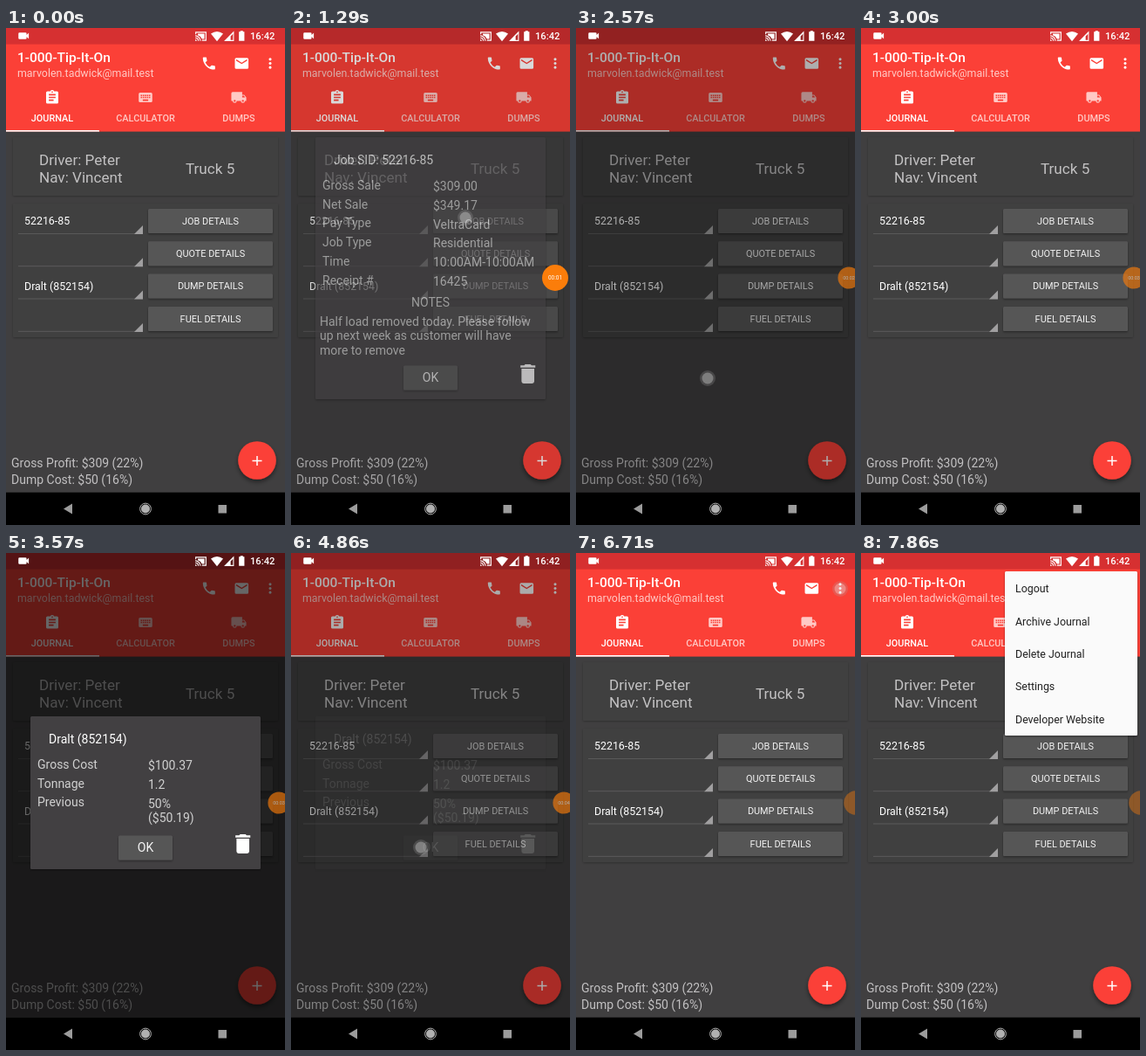
Animation of 320 by 569 pixels, one loop 8 s. Source, as an HTML page:

```html
<!DOCTYPE html>
<html lang="en">
<head>
<meta charset="utf-8">
<title>Job journal</title>
<style>
  html, body { margin: 0; height: 100%; overflow: hidden; background: #000; }
  svg { display: block; font-family: Roboto, sans-serif; }
</style>
</head>
<body>
<script>
const LOOP = 8000, STEP = 1000 / 7;
const GREY = '#c2c1c2', RED = '#fb4037', DARK_RED = '#d63031', PALE = '#ffc9c5';
const STATUS_H = 18.6, NAV_Y = 531.7;

const rect = (x, y, w, h, fill, extra = '') =>
  `<rect x="${x}" y="${y}" width="${w}" height="${h}" fill="${fill}" ${extra}/>`;
const text = (x, y, str, size = 14, fill = GREY, extra = '') =>
  `<text x="${x}" y="${y}" font-size="${size}" fill="${fill}" ${extra}>${str}</text>`;
const icon = (d, cx, cy, size = 18.7, fill = '#fff') =>
  `<path d="${d}" fill="${fill}" fill-rule="evenodd" transform="translate(${cx - size / 2} ${cy - size / 2}) scale(${size / 24})"/>`;
const shadow = (id, dy, blur, opacity) =>
  `<filter id="${id}" x="-30%" y="-30%" width="160%" height="170%">
    <feDropShadow dx="0" dy="${dy}" stdDeviation="${blur}" flood-opacity="${opacity}"/></filter>`;
const MIDDLE = 'text-anchor="middle"', MEDIUM = 'font-weight="500"';
const RAISED = 'rx="1.5" filter="url(#raised)"', FLAT = 'rx="1.5" filter="url(#flat)"';

const keys = [5, 8, 11, 14, 17].map(x => `M${x} 8h2v2h-2zM${x} 11h2v2h-2z`).join('');
const ICONS = {
  phone: 'M4 3h3.5q1 0 1 1 0 1.9.6 3.6.1.6-.3 1l-2.2 2.2q2.2 4.4 6.6 6.6l2.2-2.2q.5-.4 1-.3 1.7.6 3.6.6 1 0 1 1V20q0 1-1 1A17 17 0 0 1 3 4q0-1 1-1z',
  mail: 'M4 4h16q2 0 2 2v12q0 2-2 2H4q-2 0-2-2V6q0-2 2-2zM20 6l-8 5-8-5v2l8 5 8-5z',
  more: 'M12 4a2 2 0 1 0 .01 0zM12 10a2 2 0 1 0 .01 0zM12 16a2 2 0 1 0 .01 0z',
  journal: 'M5 3h4.2a3 3 0 0 1 5.6 0H19q2 0 2 2v14q0 2-2 2H5q-2 0-2-2V5q0-2 2-2zM12 3a1 1 0 1 0 .01 0zM7 7h10v2H7zM7 11h10v2H7zM7 15h7v2H7z',
  keyboard: 'M4 5h16q2 0 2 2v10q0 2-2 2H4q-2 0-2-2V7q0-2 2-2zM8 15h8v2H8z' + keys,
  truck: 'M3 4h14v4h3l3 4v5h-2a3 3 0 0 1-6 0H9a3 3 0 0 1-6 0H1V6q0-2 2-2zM17 9.5V12h4.5l-2-2.5zM6 15.5a1.5 1.5 0 1 0 .01 0zM18 15.5a1.5 1.5 0 1 0 .01 0z',
  trash: 'M6 7h12v12q0 2-2 2H8q-2 0-2-2zM5 4h3.5l1-1h5l1 1H19v2H5z',
  camera: 'M4 6h11q2 0 2 2v2.5l4-4v11l-4-4V16q0 2-2 2H4q-2 0-2-2V8q0-2 2-2z',
  cast: 'M1 3h22v18h-9v-2h7V5H3v3H1zM1 18a3 3 0 0 1 3 3H1zM1 14a7 7 0 0 1 7 7H6a5 5 0 0 0-5-5zM1 10a11 11 0 0 1 11 11h-2a9 9 0 0 0-9-9zM6 7h13v10h-5q-2-5-8-7z',
  wifi: 'M12 22L0 7q12-9 24 0z',
  signal: 'M1 22L22 1v21zM15 12v8h5V7z',
  battery: 'M9 1h6v2h3v20H6V3h3z'
};

const button = (x, cy, w, label, size) =>
  rect(x, cy - 14, w, 28, '#575657', RAISED) +
  text(x + w / 2, cy + size * .355, label, size, '#f4f4f4', MIDDLE);

const statusIcons = icon(ICONS.camera, 20.5, 9, 15) + icon(ICONS.cast, 223.5, 9.5, 14) +
  icon(ICONS.wifi, 242, 9.5, 14) + icon(ICONS.signal, 256, 9.5, 13) +
  icon(ICONS.battery, 270.3, 9, 12.5) + text(280, 13.3, '16:42', 11.2, '#fff', MEDIUM);

const tab = (cx, label, name, fill) =>
  icon(ICONS[name], cx, 79.5, 18.7, fill) + text(cx, 107, label, 10.9, fill, `${MIDDLE} ${MEDIUM}`);

const header = rect(0, 0, 320, 118.6, RED) + rect(0, 0, 320, STATUS_H, DARK_RED) +
  text(13, 38.5, '1-000-Tip-It-On', 15.56, '#fff', MEDIUM) +
  text(13, 56, 'marvolen.tadwick@mail.test', 12.4, PALE) +
  icon(ICONS.phone, 232.8, 40.5) + icon(ICONS.mail, 270.3, 40.5) + icon(ICONS.more, 303, 40.5) +
  tab(53, 'JOURNAL', 'journal', '#fff') + tab(160, 'CALCULATOR', 'keyboard', PALE) +
  tab(267, 'DUMPS', 'truck', PALE) + rect(0, 117, 107, 1.6, '#fff');

const row = (label, i, value) => {
  const cy = 221 + i * 37.3;
  return text(21, cy + 4.4, value, 12.4, '#fff') +
    rect(14, cy + 14, 143, .8, '#605f60') +
    `<path d="M157 ${cy + 5}v10h-10z" fill="#a09fa0"/>` + button(163, cy, 143, label, 10.9);
};

const page = rect(0, 118, 320, 414, '#403f40') +
  rect(8, 125, 304, 67, '#414041', FLAT) + rect(8, 201, 304, 153, '#414041', FLAT) +
  text(38, 157, 'Driver: Peter', 17.1) + text(38, 177, 'Nav: Vincent', 17.1) +
  text(206, 167, 'Truck 5', 17.1) +
  row('JOB DETAILS', 0, '52216-85') + row('QUOTE DETAILS', 1, '') +
  row('DUMP DETAILS', 2, 'Dralt (852154)') + row('FUEL DETAILS', 3, '') +
  text(6, 503, 'Gross Profit: $309 (22%)') + text(6, 522, 'Dump Cost: $50 (16%)') +
  `<circle cx="288" cy="495" r="21.8" fill="${RED}" filter="url(#floating)"/>
   <path d="M282.5 495.5h11M288 490v11" stroke="#fff" stroke-width="1.5"/>`;

const navBar = rect(0, NAV_Y, 320, 37.3, '#000') +
  `<path d="M66 550.5l10-6v12z" fill="#9c9c9c"/>
   <circle cx="160" cy="550.5" r="6.4" fill="none" stroke="#b0b0b0"/>
   <circle cx="160" cy="550.5" r="5" fill="#b0b0b0"/>` + rect(243.5, 546, 9.5, 9.5, '#9c9c9c');

// Rows are [label, value]; an empty label continues the value above.
const dialog = (id, top, height, title, rows, notes = '') => {
  const bottom = top + height;
  return `<g id="${id}">` + rect(28, top, 264, height, '#424142', RAISED) +
    text(49, top + 31, title, 14, '#fff') +
    rows.map(([label, value], i) => {
      const y = top + 60 + i * 21.7 - (label ? 0 : 5.3);
      return text(36, y, label, 14, '#d0d0d0') + text(163, y + 1.2, value, 14, '#d0d0d0');
    }).join('') + notes +
    button(129, bottom - 24.5, 62, 'OK', 14) + icon(ICONS.trash, 271.7, bottom - 29, 29.3) + '</g>';
};

const notes = text(160, 319, 'NOTES', 14, '#d0d0d0', MIDDLE) +
  ['Half load removed today. Please follow', 'up next week as customer will have', 'more to remove']
    .map((line, i) => text(33, 341 + i * 16.4, line, 14, '#d0d0d0')).join('');

const dialogs = dialog('job', 125, 300, 'Job SID: 52216-85', [
  ['Gross Sale', '$309.00'], ['Net Sale', '$349.17'], ['Pay Type', 'VeltraCard'],
  ['Job Type', 'Residential'], ['Time', '10:00AM-10:00AM'], ['Receipt #', '16425']
], notes) + dialog('dump', 187, 175, 'Dralt (852154)', [
  ['Gross Cost', '$100.37'], ['Tonnage', '1.2'], ['Previous', '50%'], ['', '($50.19)']
]);

const menu = '<g id="menu">' + rect(165, 21, 152, 188, '#fafafa', RAISED) +
  ['Logout', 'Archive Journal', 'Delete Journal', 'Settings', 'Developer Website']
    .map((item, i) => text(177, 45.3 + i * 37.3, item, 12.4, '#202020')).join('') + '</g>';

document.body.innerHTML = `<svg width="320" height="569" viewBox="0 0 320 569">
  ${shadow('raised', 1.2, 1.3, .4)}${shadow('flat', .8, 1, .3)}${shadow('floating', 3, 2.5, .45)}
  ${page}${header}${rect(0, 0, 320, NAV_Y, '#000', 'id="dim"')}
  ${statusIcons}${dialogs}${menu}${navBar}
  <g id="touch"><circle r="9" fill="#aaa" opacity=".5"/><circle r="6.5" fill="#e0e0e0"/></g>
  <g id="bubble"><circle r="15" fill="#fb7d0a"/>
    <text id="timer" y="2.2" font-size="6.5" fill="#fff" ${MIDDLE}></text></g>
</svg>`;

const parts = Object.fromEntries([...document.querySelectorAll('[id]')].map(el => [el.id, el]));

// Linear interpolation through [time, value] points.
function track(t, points) {
  let [t0, v0] = points[0];
  for (const [t1, v1] of points) {
    if (t < t1) return t1 > t0 ? v0 + (v1 - v0) * (t - t0) / (t1 - t0) : v0;
    [t0, v0] = [t1, v1];
  }
  return v0;
}

const OPACITY = {
  dim: [[1143, 0], [1286, .15], [1429, .48], [1571, .6], [2286, .6], [2571, .32], [2714, 0],
        [3286, 0], [3571, .6], [4714, .6], [4857, .33], [5000, 0]],
  job: [[1143, 0], [1286, .66], [1429, 1], [2286, 1], [2429, .6], [2571, 0]],
  dump: [[3286, 0], [3429, .66], [3571, 1], [4714, 1], [4857, .15], [5000, 0]],
  menu: [[6857, 0], [7143, 1]],
  bubble: [[714, 0], [857, 1], [1857, 1], [2143, .64], [5286, .64], [5571, .42]]
};
const BUBBLE_X = [[1857, 303], [2143, 313], [5286, 313], [5571, 321]];
const BUBBLE_SCALE = [[1857, 1], [2143, .84], [5286, .84], [5571, .92]];
const TOUCHES = [[1143, 200, 217], [2429, 151, 401], [3143, 200, 297], [4714, 149, 337], [6714, 303, 41]];

const start = performance.now();

function draw() {
  const now = (performance.now() - start) % LOOP;
  const t = Math.floor((now + 5) / STEP) * STEP;
  for (const id in OPACITY) parts[id].setAttribute('opacity', track(t, OPACITY[id]));

  const grow = .8 + .2 * track(t, OPACITY.menu);
  parts.menu.setAttribute('transform', `translate(317 21) scale(${grow}) translate(-317 -21)`);

  const touch = TOUCHES.find(([begin]) => t > begin - 9 && t < begin + 2 * STEP - 9);
  parts.touch.setAttribute('opacity', touch ? .45 : 0);
  if (touch) parts.touch.setAttribute('transform', `translate(${touch[1]} ${touch[2]})`);

  parts.bubble.setAttribute('transform', `translate(${track(t, BUBBLE_X)} 286) scale(${track(t, BUBBLE_SCALE)})`);
  parts.timer.textContent = t < 5400 ? '00:0' + Math.floor(t / 1000) : '';
  requestAnimationFrame(draw);
}
draw();
</script>
</body>
</html>
```
